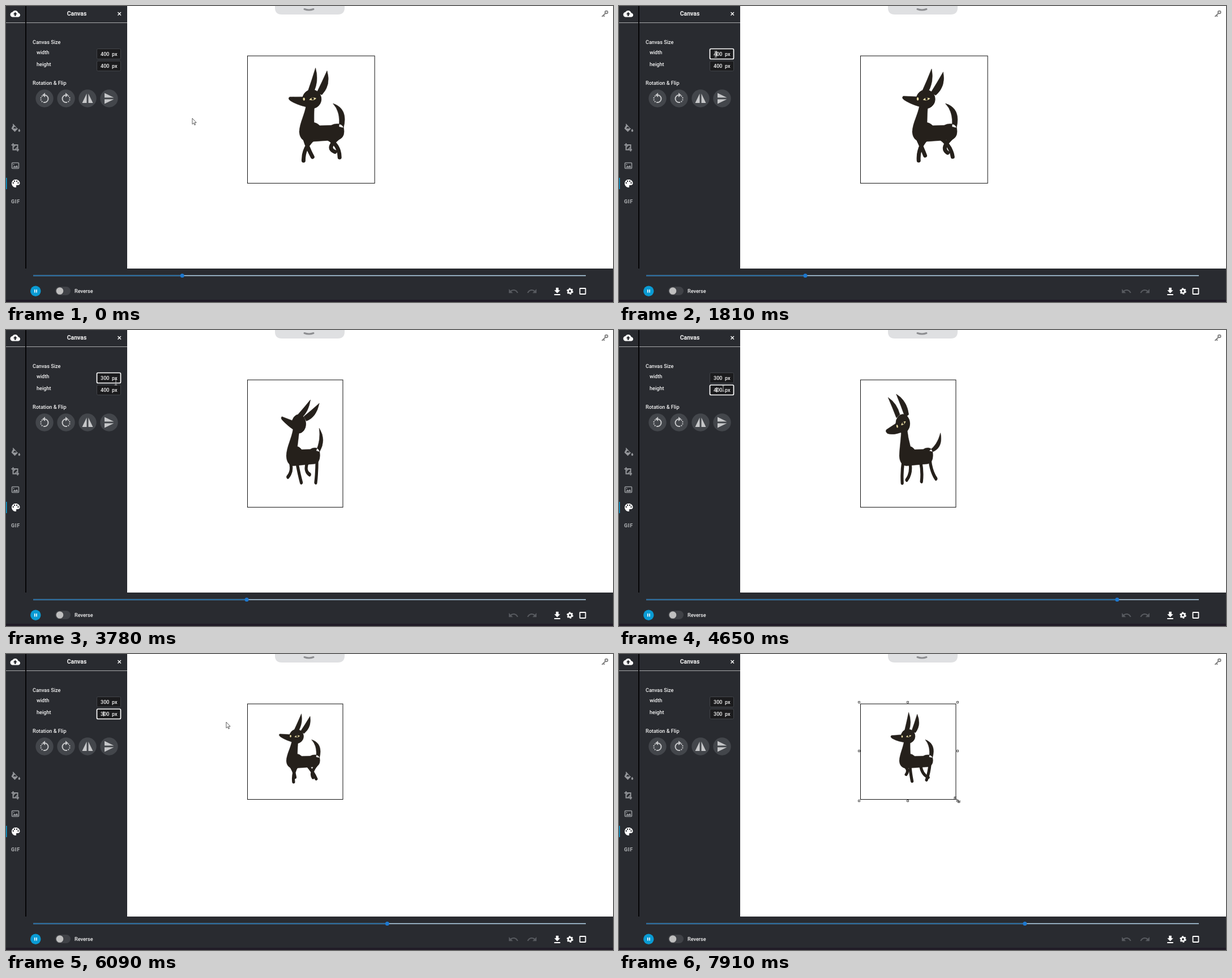
These frames come from a looping animation (1072x522 px, 7990 ms). An HTML page:

```html
<!DOCTYPE html>
<html lang="en">
<head>
<meta charset="utf-8">
<title>Canvas size</title>
<style>
html, body { margin: 0; width: 100%; height: 100%; overflow: hidden; background: #fff; }
svg { display: block; }
text { font: 500 9.1px Roboto, Arial, sans-serif; fill: #f4f4f4; white-space: pre; }
.title { font-weight: 700; font-size: 10.5px; text-anchor: middle; }
.line { fill: none; stroke-linecap: round; stroke-linejoin: round; }
</style>
</head>
<body>
<svg width="1072" height="522" viewBox="0 0 1072 522">
  <rect width="1072" height="522" fill="#fff"/>
  <!-- top tab and key -->
  <path d="M475 0H598V3Q598 15 586 15H487Q475 15 475 3Z" fill="#dfe0e2"/>
  <path class="line" d="M527 5.5Q535 8.5 543 5.5" stroke="#8d8e91" stroke-width="3"/>
  <g class="line" stroke="#858585" stroke-width="2">
    <circle cx="1060.300" cy="11" r="2.300"/><path d="M1058.500 13L1053 18.300M1055 16.500L1056.500 18"/>
  </g>

  <!-- canvas -->
  <rect id="frame" x="426.500" y="88" fill="#fff" stroke="#111"/>
  <g id="dog" fill="#25201b" stroke="#25201b">
    <path id="legs" fill="none" stroke-width="7" stroke-linecap="round"/>
    <path id="body" stroke-width=".6"/>
    <circle id="skull" r="16.500"/>
    <g id="eyes" fill="#e9dca4" stroke="none">
      <path d="M-5 1Q0 -5 8 -1Q3 4 -5 1Z"/><ellipse cx="-14" cy="-1" rx="1.800" ry="2.800"/>
      <circle cx="1.500" cy="-.500" r="2.200" fill="#25201b"/>
    </g>
  </g>
  <path id="grips" fill="#fff" stroke="#333" stroke-width=".9"/>

  <!-- side panel -->
  <path d="M0 0H214V463H1072V522H0Z" fill="#292b30"/>
  <rect y="518" width="1072" height="4" fill="#211c27"/>
  <rect x="34" width="2" height="463" fill="#050506"/>
  <path d="M0 29.500H34M36 29.500H214" stroke="#a9aaac"/>
  <rect y="303" width="1.500" height="20" fill="#0a9fd8"/>
  <text class="title" x="125" y="17">Canvas</text>
  <path d="M197.500 11L203 16.500M203 11L197.500 16.500" stroke="#fff" stroke-width="1.400"/>
  <text x="47" y="67">Canvas Size</text>
  <text x="54" y="85">width</text>
  <text x="54" y="106">height</text>
  <text x="47" y="139">Rotation &amp; Flip</text>
  <g fill="#1b1b1d">
    <rect id="boxW" x="160.500" y="75.500" width="42" height="18" rx="2"/>
    <rect id="boxH" x="160.500" y="97" width="42" height="17.500" rx="2"/>
  </g>
  <text id="textW" y="87.500"></text><text x="187" y="87.500">px</text>
  <text id="textH" y="109"></text><text x="187" y="109">px</text>
  <path id="caret" stroke="#fff"/>

  <g fill="#43464b">
    <circle cx="68" cy="163" r="15.700"/><circle cx="106" cy="163" r="15.700"/>
    <circle cx="144" cy="163" r="15.700"/><circle cx="182" cy="163" r="15.700"/>
  </g>
  <defs>
    <g id="turn">
      <path d="M0 -6A6.300 6.300 0 0 1 0 7" fill="none" stroke="#c6c7c9" stroke-width="2"/>
      <path d="M0 7A6.300 6.300 0 0 1 -3 -5" fill="none" stroke="#c6c7c9" stroke-width="2" stroke-dasharray="2 1.600"/>
      <path d="M1 -10V-2L-4 -6Z" fill="#c6c7c9"/>
    </g>
    <path id="flip" d="M-1.500 -8.500V8H-9.500ZM1.500 -8.500V8H9.500Z" fill="#c6c7c9"/>
    <path id="back" d="M12.500 8c-2.650 0-5.050 1-6.900 2.600L2 7v9h9l-3.600-3.600c1.400-1.200 3.100-1.900 5.100-1.900 3.500 0 6.500 2.300 7.600 5.500l2.400-.8C21 11 17.200 8 12.500 8z" fill="#575a5f"/>
  </defs>
  <use href="#turn" x="68" y="163"/>
  <use href="#turn" transform="translate(106 163) scale(-1 1)"/>
  <use href="#flip" x="144" y="163"/>
  <use href="#flip" transform="translate(182 163) rotate(90)"/>

  <!-- tool strip -->
  <path transform="translate(7.500 5) scale(.73)" fill="#fff" d="M19.300 10C18.700 6.600 15.600 4 12 4 9.100 4 6.600 5.600 5.300 8 2.300 8.400 0 10.900 0 14c0 3.300 2.700 6 6 6h13c2.800 0 5-2.200 5-5 0-2.600-2-4.800-4.700-5zM14 13v4h-4v-4H7l5-5 5 5h-3z"/>
  <g fill="#94969a">
    <path d="M13 209L21 216.500L15.500 222L9.500 216Z"/><path class="line" d="M12.500 208.500L16.500 213" stroke="#94969a" stroke-width="1.500"/>
    <path d="M12.500 216H19L15.500 212.500Z" fill="#292b30"/>
    <path d="M23.300 216.500Q27 221 23.300 222Q20 221 23.300 216.500Z"/>
    <path d="M12.500 242V253.500H23M9.500 245H20.500V256.500" fill="none" stroke="#94969a" stroke-width="2"/>
    <path d="M13 249L17 245M20 249L16 253" stroke="#94969a" stroke-width="1.500"/>
    <rect x="10.500" y="276.500" width="12" height="10" rx="1" fill="none" stroke="#94969a" stroke-width="1.600"/>
    <path d="M12 285L15 281.500L17 283.500L19 280.500L21.500 285Z"/><circle cx="13.500" cy="279.500" r="1"/>
  </g>
  <path d="M17 306C12.500 306 10 309.500 10 313S13 320 17 320C19.500 320 17 317 18.500 316H21Q24.500 315.500 24.500 312.500C24.500 308.500 21 306 17 306Z" fill="#fff"/>
  <g fill="#292b30"><circle cx="12.800" cy="312" r="1.200"/><circle cx="15" cy="309" r="1.200"/><circle cx="19" cy="309" r="1.200"/><circle cx="21.500" cy="312" r="1.200"/></g>
  <text x="9" y="347.500" style="font-weight:900;letter-spacing:.6px;fill:#a2a4a7">GIF</text>

  <!-- player -->
  <path d="M48 475.500H1024" stroke="#b9daf0" stroke-width="1.500"/>
  <path id="played" stroke="#1b6fb0" stroke-width="1.500"/>
  <circle id="knob" cy="475.500" r="3.500" fill="#1d78cf"/>
  <circle cx="52.300" cy="502.700" r="9.200" fill="#0a9bd3"/>
  <path d="M50.800 500V505.500M54 500V505.500" stroke="#fff" stroke-width="1.600"/>
  <rect x="87" y="495" width="27" height="15" rx="7.500" fill="#404247"/>
  <circle cx="95" cy="502.500" r="6.300" fill="#bfbfbf"/>
  <text x="121" y="505.500">Reverse</text>
  <use href="#back" transform="translate(886.500 493.500) scale(.8)"/>
  <use href="#back" transform="translate(938.500 493.500) scale(-.8 .8)"/>
  <path transform="translate(964.500 494.500) scale(.75)" fill="#fff" d="M19 9H15V3H9V9H5L12 16ZM5 18V20.500H19V18Z"/>
  <g fill="none" stroke="#fff">
    <circle cx="996" cy="503" r="3.200" stroke-width="2.600"/>
    <circle cx="996" cy="503" r="4.900" stroke-width="1.800" stroke-dasharray="2.800 2.331"/>
    <rect x="1013.500" y="498" width="10" height="10" rx=".5" stroke-width="1.800"/>
  </g>

  <!-- pointers -->
  <path id="arrow" d="M0 0V10.500L2.400 8.200 4 12 5.600 11.300 4 7.700H7.200Z" fill="#fff" stroke="#333" stroke-width=".8"/>
  <path id="beam" class="line" d="M-2 -5H2M0 -5V5M-2 5H2" stroke="#c9c9c9" stroke-width=".9"/>
  <g id="move">
    <circle id="press" r="6.500" fill="#f0ea2e"/>
    <path d="M0 -5.500L2 -3H-2ZM0 5.500L2 3H-2ZM-5.500 0L-3 2V-2ZM5.500 0L3 2V-2ZM0 -3V3M-3 0H3" fill="#fff" stroke="#4c4a18" stroke-width=".8"/>
  </g>
  <path id="size" d="M-5 -5H-1.500L-5 -1.500ZM5 5H1.500L5 1.500ZM-3.500 -3.500L3.500 3.500" fill="#fff" stroke="#222" stroke-width=".9"/>
</svg>
<script>
const $ = id => document.getElementById(id);
const set = (id, attrs) => { for (const a in attrs) $(id).setAttribute(a, attrs[a]); };
const show = (id, on) => set(id, { visibility: on ? 'visible' : 'hidden' });

const LOOP = 7990, STEP = 78.8, FRAMES = 137, WALK = FRAMES / 3;

// Linear interpolation over rows of [key, ...values]
function track(rows, k) {
  let i = 0;
  while (i < rows.length - 2 && k > rows[i + 1][0]) i++;
  const a = rows[i], b = rows[i + 1];
  const u = Math.max(0, Math.min(1, (k - a[0]) / (b[0] - a[0])));
  return a.slice(1).map((v, j) => v + (b[j + 1] - v) * u);
}
// Repeats the ends so that a track wraps round
function cyclic(rows) {
  const shift = (row, d) => [row[0] + d, ...row.slice(1)];
  return [shift(rows[rows.length - 1], -WALK), ...rows, shift(rows[0], WALK)];
}

const playhead = [[0, 37], [13, 115], [33, 238], [48, 327], [69, 449], [86, 555], [100, 642], [102, 654]];
const pointer = [[0, 329, 198], [7, 230, 95], [11, 175, 86], [13, 169, 85], [24, 171, 85], [30, 247, 83],
  [42, 247, 83], [48, 194, 92], [53, 184, 104], [69, 184, 101], [82, 517, 132], [88, 517, 132], [97, 597, 257]];

const beats = [2.67, 7.2, 9.66, 23.67, 37.5];
const gait = rows => cyclic(rows.map((r, i) => [beats[i], ...r]));
// Each leg: hip, then knee and foot at each beat
const legs = [
  { hip: [527, 232], way: gait([[543, 242, 534, 254], [534, 248, 522, 259], [530, 254, 516, 262], [522, 252, 522, 270], [532, 248, 542, 266]]) },
  { hip: [543, 234], way: gait([[544, 250, 548, 270], [547, 252, 553, 269], [550, 253, 557, 268], [551, 253, 537, 263], [524, 250, 525, 273]]) },
  { hip: [568, 233], way: gait([[571, 254, 586, 261], [560, 248, 573, 255], [550, 245, 568, 254], [570, 250, 567, 267], [590, 245, 590, 267]]) },
  { hip: [590, 230], way: gait([[588, 250, 582, 267], [590, 250, 587, 269], [590, 250, 590, 269], [598, 250, 608, 263], [562, 250, 580, 257]]) }
];
const tailTip = gait([[579], [595], [604], [621], [576]]);

function ear(bx, by, tx, ty, bulge) {
  const len = Math.hypot(tx - bx, ty - by);
  const nx = -(ty - by) / len, ny = (tx - bx) / len;
  const mx = (bx + tx) / 2, my = (by + ty) / 2;
  const at = (x, y, d) => `${x + nx * d} ${y + ny * d}`;
  return `M${at(bx, by, -5)}Q${at(mx, my, -2)} ${tx} ${ty}Q${at(mx, my, bulge)} ${at(bx, by, 5)}Z`;
}

function drawDog(frame) {
  const q = frame % WALK;
  const s = Math.cos(2 * Math.PI * (frame - 64) / FRAMES);
  set('legs', { d: legs.map(l => {
    const [kx, ky, fx, fy] = track(l.way, q);
    return `M${l.hip}Q${kx} ${ky} ${fx} ${fy}`;
  }).join('') });

  const hx = 536 + 13 * s, hy = 164 + 2 * s * s;
  const nx = 495 + 12 * s, ny = 167 - 14 * s;
  const [tx] = track(tailTip, q), u = (tx - 576) / 45;
  const torso = `M${528 + 7 * s} 174C${526 + 5 * s} 192 519 205 518 222Q519 238 534 239.500L585 236Q597 234 597 221` +
    `Q597 209 588 208Q580 207 574 210.500L554 211Q549 206 544 205.500Q${542 + 5 * s} 190 ${542 + 8 * s} 174Z`;
  const tail = `M588 213Q${591 + 19 * u} ${187 + 19 * u} ${tx} ${172 + 15 * u ** 3}Q${604 + 20 * u} ${180 + 32 * u} 596 215Z`;
  const snout = `M${hx - 9} ${hy - 4}L${nx + 2} ${ny - 2}Q${nx - 2} ${ny + 1} ${nx + 4} ${ny + 5}` +
    `Q${nx + 18} ${ny + 12 + 5 * s} ${hx - 3} ${hy + 15}Z`;
  set('body', { d: torso + tail + snout +
    ear(531 + 21 * s, 152, 530 + 51 * s, 107 + 21 * s * s, 11) +
    ear(548 + 16 * s, 154 + 3 * s, 550 + 52 * s, 110 + 8 * s + 16 * s * s, 15) });
  set('skull', { cx: hx, cy: hy });
  set('eyes', { transform: `translate(${hx} ${hy}) rotate(${18 * s - 10})` });
  show('eyes', s < 0.7);
}

function drawField(name, value, focus, hover) {
  set('box' + name, { stroke: focus || hover ? '#fff' : '#424449', 'stroke-width': focus ? 1.7 : 1 });
  set('text' + name, { x: 167 });
  $('text' + name).textContent = value;
}

function drawPointer(k, x, y, overField, w, h) {
  const corner = k >= 83 && Math.hypot(x - 426.5 - w, y - 88 - h) < 8;
  const inside = x > 427 && x < 426 + w && y > 88 && y < 88 + h;
  const kind = corner ? 'size' : inside ? 'move' : overField ? 'beam' : 'arrow';
  for (const id of ['arrow', 'beam', 'move', 'size']) {
    set(id, { transform: `translate(${x} ${y})`, display: id === kind ? 'inline' : 'none' });
  }
  set('press', { display: k >= 83 && k < 88 ? 'inline' : 'none' });
}

function draw(ms) {
  const k = Math.floor(ms / STEP + 0.25);
  const [total] = track(playhead, k), frame = total % FRAMES;
  const knob = 48 + frame * 7.115;
  set('knob', { cx: knob });
  set('played', { d: `M48 475.500H${knob}` });

  const w = (k < 38 ? 400 : 300) * 0.5615, h = (k < 63 ? 400 : 300) * 0.5615;
  set('frame', { width: w, height: h });
  set('dog', { transform: `translate(426.5 88) scale(${w / 224.6} ${h / 224.6}) translate(-426.5 -88)` });
  drawDog(frame);

  const [x, y] = track(pointer, k);
  const inRow = (top, bottom) => x > 160 && x < 203 && y > top && y < bottom;
  const overW = inRow(75, 95), overH = inRow(96, 115);
  const typing = (a, b) => k < a ? '400' : k < b ? '00' : '300';
  const focusW = k >= 19 && k < 57, focusH = k >= 57 && k < 83;
  const valueW = typing(35, 38), valueH = typing(60, 63);
  drawField('W', valueW, focusW, overW);
  drawField('H', valueH, focusH, overH);

  const last = [19, 35, 38, 57, 60, 63].filter(e => e <= k).pop();
  const cx = (focusW ? valueW : valueH).length < 3 ? 167 : 172.5;
  const cy = focusW ? 79.5 : 101;
  set('caret', { d: `M${cx} ${cy}V${cy + 9}` });
  show('caret', (focusW || focusH) && Math.floor((k - last) / 6.35) % 2 === 0);

  show('grips', k >= 83);
  const box = (gx, gy) => `M${gx - 1.5} ${gy - 1.5}h3v3h-3Z`;
  set('grips', { d: [424, 510, 598].map(gx => [85, 171, 259].map(gy =>
    gx === 510 && gy === 171 ? '' : box(gx, gy)).join('')).join('') });
  drawPointer(k, x, y, overW || overH, w, h);
}

const start = performance.now();
function tick() {
  draw((performance.now() - start) % LOOP);
  requestAnimationFrame(tick);
}
tick();
</script>
</body>
</html>
```
